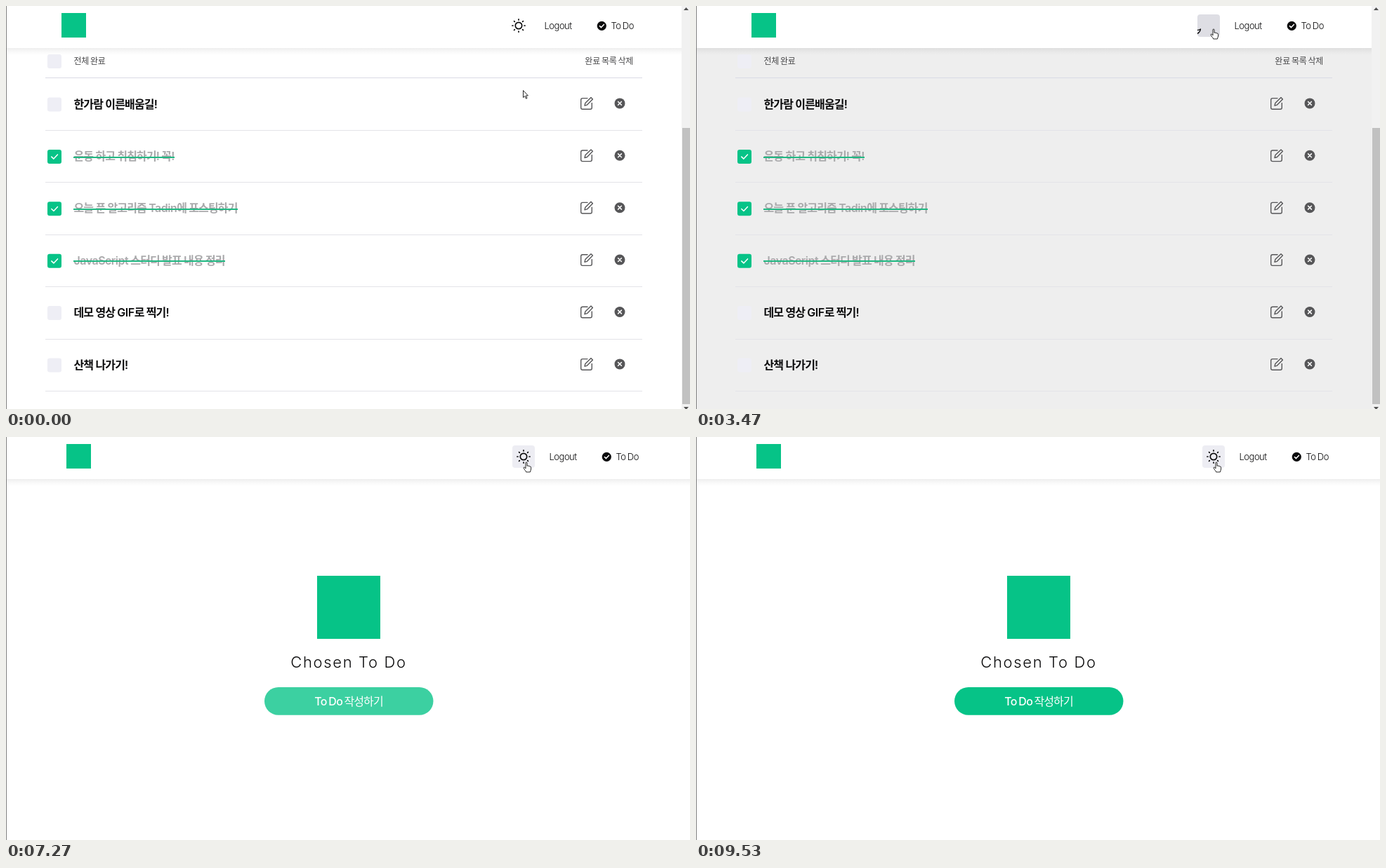
An HTML page for the animation above (9670 ms loop, 974 by 575 pixels).

```html
<!DOCTYPE html>
<html lang="ko">
<head>
<meta charset="utf-8">
<title>To Do</title>
<style>
html, body { margin: 0; width: 100%; height: 100%; overflow: hidden; }
svg {
  display: block; width: 100vw; height: 100vh;
  font-family: Inter, "Noto Sans CJK KR", "Noto Sans CJK", sans-serif;
  --bar: #fff; --ink: #0b0b0c; --sub: #4a4a4c; --done: #a9a9ab; --box: #eeeef5;
  --rule: #d9dae5; --line: #e3e3e8; --icon: #565658; --edge: #808080; --shade: #000; --depth: .065;
}
svg.dark {
  --bar: #08090d; --ink: #fff; --sub: #e2e2ec; --done: #58595c; --box: #17181c;
  --rule: #2a2b30; --line: #1b1c20; --icon: #dcdce8; --edge: #38393c; --shade: #1c1d21; --depth: .6;
}
text { fill: var(--ink); white-space: pre; }
.item { font-size: 16px; font-weight: 600; letter-spacing: -.85px; }
.latin { letter-spacing: -.5px; }
.small { font-size: 12px; font-weight: 500; letter-spacing: -.25px; word-spacing: -1px; fill: var(--sub); }
.nav { font-size: 13px; font-weight: 300; letter-spacing: -.5px; word-spacing: -.8px; }
#title { font-size: 22px; font-weight: 300; letter-spacing: 1.65px; }
.dark .nav, .dark #title { font-weight: 400; }
#start text { fill: #fff; font-weight: 500; word-spacing: -1.5px; }
.brand { fill: #06c387; }
.stroke { fill: none; stroke: var(--icon); stroke-width: 1.4; stroke-linecap: round; stroke-linejoin: round; }
.tick { fill: none; stroke-width: 1.5; stroke-linecap: round; stroke-linejoin: round; }
.crisp { shape-rendering: crispEdges; }
</style>
</head>
<body>
<svg id="stage" viewBox="0 0 974 575" preserveAspectRatio="none">
  <defs>
    <linearGradient id="shade" x2="0" y2="1" stop-color="var(--shade)">
      <stop stop-color="var(--shade)" stop-opacity="1"/>
      <stop offset=".5" stop-color="var(--shade)" stop-opacity=".4"/>
      <stop offset="1" stop-color="var(--shade)" stop-opacity="0"/>
    </linearGradient>
    <clipPath id="clip"><rect x="-16" y="-16" width="32" height="32" rx="4"/></clipPath>
  </defs>
  <rect id="page" width="974" height="575"/>

  <g id="list"></g>

  <g id="home">
    <rect id="mark" class="brand" x="443" width="90" height="90"/>
    <text id="title" x="488" y="329" text-anchor="middle">Chosen To Do</text>
    <g id="start">
      <rect class="brand" x="368" y="357" width="240.5" height="39.7" rx="19.85"/>
      <text class="item" x="488" y="382.5" text-anchor="middle"><tspan class="latin">To Do</tspan> 작성하기</text>
    </g>
  </g>

  <rect width="974" height="60" fill="var(--bar)"/>
  <rect y="60" width="974" height="10" fill="url(#shade)" style="opacity:var(--depth)"/>
  <g id="nav">
    <rect class="brand" x="79" y="10" width="35" height="35"/>
    <g transform="translate(730 28)" clip-path="url(#clip)">
      <rect id="hover" x="-16" y="-16" width="32" height="32"/>
      <g id="icon" fill="none" stroke="var(--ink)" stroke-width="1.7" stroke-linecap="round" stroke-linejoin="round">
        <g id="sun"><circle r="4.7"/></g>
        <path id="moon" transform="scale(.88) translate(-12 -12)" d="M21 12.8A9 9 0 1 1 11.2 3A7 7 0 0 0 21 12.8z"/>
      </g>
    </g>
    <text class="nav" x="766.5" y="33">Logout</text>
    <circle cx="848.3" cy="28.3" r="6.6" fill="var(--ink)"/>
    <path class="tick" stroke="var(--bar)" d="M845.4 28.5l2.1 2.1 3.9-4.2"/>
    <text class="nav" x="861.5" y="33">To Do</text>
  </g>

  <g id="scroll">
    <rect x="962" width="12" height="575" fill="#f1f1f1"/>
    <rect x="963" y="174" width="11" height="394" fill="#c1c1c1"/>
    <path d="M965 6l3.5-4 3.5 4zM965 572h7l-3.5 4z" fill="#505050"/>
  </g>
  <rect width="1" height="575" fill="var(--edge)"/>

  <g id="status">
    <path d="M0 564.5H190a3.5 3.5 0 0 1 3.5 3.5V575H0z" fill="#6c6c6c"/>
    <text x="3" y="576.5" font-size="10.2" style="fill:#fff;font-family:'Open Sans','Noto Sans',sans-serif" letter-spacing="-.3">https://maplerain-wanted-to-do.vercel.app</text>
  </g>

  <g id="cursor" fill="#fff" stroke="#111" stroke-width=".9" stroke-linejoin="round">
    <path id="arrow" d="M.5 .5V10.6L2.8 8.5 4.5 12.2 6 11.5 4.4 7.9H7.4z"/>
    <path id="hand" d="M-1 1C-1-.4 1-.4 1 1V5.4C1.6 4.5 3 4.7 3 5.8 3.8 5 5 5.3 5 6.4 5.8 5.9 6.6 6.3 6.6 7.3V10C6.6 11.6 5.4 12.3 5.4 14H-.4C-.6 12-3.4 10.4-3.9 8.1-4.1 6.9-2.5 6.8-1.9 7.9L-1 9z"/>
  </g>
</svg>
<script>
const LOOP = 9670, HOME_AT = 5000;
const CLICKS = [1370, 3190, 7630, 8700];
const ROWS = [
  ['한가람 이른배움길!'],
  ['운동 하고 취침하기! 꼭!', true],
  ['오늘 푼 알고리즘 Tadin에 포스팅하기', true],
  ['JavaScript 스터디 발표 내용 정리', true],
  ['데모 영상 GIF로 찍기!'],
  ['산책 나가기!'],
];
// time, x, y of the pointer tip
const PATH = [
  [70, 736, 120], [130, 737, 117], [330, 737, 117], [670, 738, 33], [870, 738, 33],
  [930, 737, 33], [4200, 737, 33], [4700, 100, 25], [5000, 100, 30], [5180, 100, 37],
  [5380, 800, 228], [5530, 749, 202], [5800, 749, 202], [6130, 741, 36],
];

const $ = id => document.getElementById(id);
const show = (id, on) => $(id).style.display = on ? '' : 'none';
const ramp = (t, from, to) => Math.min(1, Math.max(0, (t - from) / (to - from)));
const easeOut = p => 1 - (1 - p) ** 2.2;
const smooth = p => p * p * (3 - 2 * p);
const mix = (a, b, p) => a + (b - a) * p;
const blend = (a, b, p) => `rgb(${a.map((v, i) => Math.round(mix(v, b[i], p)))})`;

const checkbox = (y, done) => `
  <rect x="59" y="${y - 10}" width="20" height="20" rx="3" fill="${done ? '#06c387' : 'var(--box)'}"/>
  ${done ? `<path class="tick" stroke="#fff" d="M64.8 ${y + .2}l3.1 3 5.6-6"/>` : ''}`;

const rule = (y, color) =>
  `<rect class="crisp" x="56" y="${y}" width="850" height="1" fill="var(--${color})"/>`;

function row([label, done], i) {
  const y = 140.5 + 74.4 * i;
  const text = label.replace(/[A-Za-z]+/g, '<tspan class="latin">$&</tspan>');
  return `${checkbox(y, done)}
    <text class="item" x="96.5" y="${y + 5}" ${done ? 'data-done style="fill:var(--done)"' : ''}>${text}</text>
    <g transform="translate(827 ${y - 1.6})">
      <path class="stroke" d="M1-7.3H-6Q-8.3-7.3-8.3-5V6Q-8.3 8.3-6 8.3H5Q7.3 8.3 7.3 6V-.5M-3 3.2L-2.1-.5 6-8.4 8.4-6 .5 2.2z"/>
      <circle cx="47" r="7.5" fill="var(--icon)"/>
      <path class="tick" stroke="var(--bar)" d="M44.6-2.4l4.8 4.8m0-4.8l-4.8 4.8"/>
    </g>
    ${rule(Math.round(y + 36.4), 'line')}`;
}

$('list').innerHTML = checkbox(79) + rule(102, 'rule') + `
  <text class="small" x="96.5" y="83.2">전체 완료</text>
  <text class="small" x="893" y="83.2" text-anchor="end">완료 목록 삭제</text>` + ROWS.map(row).join('');

for (const text of document.querySelectorAll('[data-done]')) {
  const y = Math.round(text.getAttribute('y') - 5.4);
  text.insertAdjacentHTML('afterend',
    `<rect class="crisp" x="96" y="${y}" width="${text.getComputedTextLength() + 1}" height="2" fill="#1fb882"/>`);
}
for (let a = 0; a < 360; a += 45)
  $('sun').innerHTML += `<path d="M0-8V-9.1" transform="rotate(${a})"/>`;

function pointer(t) {
  const n = PATH.findIndex(k => k[0] > t);
  if (n < 0) return PATH.at(-1).slice(1);
  if (n === 0) return PATH[0].slice(1);
  const [a, b] = [PATH[n - 1], PATH[n]];
  const p = smooth(ramp(t, a[0], b[0]));
  return [mix(a[1], b[1], p), mix(a[2], b[2], p)];
}

function draw() {
  const t = performance.now() % LOOP;
  const home = t >= HOME_AT, shift = home ? 7 : 0;
  const past = CLICKS.filter(c => c <= t);
  const dark = past.length % 2 === 1;
  const since = past.length ? t - past.at(-1) : LOOP;
  const fade = easeOut(ramp(since, 0, 400));
  const night = dark ? fade : 1 - fade;

  $('stage').classList.toggle('dark', dark);
  $('page').style.fill = blend([255, 255, 255], [8, 9, 13], night);
  show('list', !home);
  show('scroll', !home);
  show('home', home);
  $('nav').setAttribute('transform', `translate(${shift})`);

  // the old icon sets to the left, then the new one arrives from the right
  const leaving = since < 400;
  const away = leaving ? ramp(since, 0, 400) ** 1.4 : (1 - ramp(since, 400, 850)) ** 3;
  $('icon').setAttribute('transform', `translate(${(leaving ? -32 : 32) * away} ${7 * away})`);
  show('moon', dark !== leaving);
  show('sun', dark === leaving);

  const [x, y] = pointer(t);
  const onToggle = y < 44 && Math.abs(x - 730 - shift) < 16;
  const onLogo = y < 46 && x < 140;
  $('hover').style.fill = blend([237, 237, 243], [23, 24, 28], night);
  show('hover', onToggle);
  show('hand', onToggle || onLogo);
  show('arrow', !onToggle && !onLogo);
  $('cursor').setAttribute('transform', `translate(${x} ${y})`);

  $('status').style.opacity = ramp(t, 4680, 4780) * (1 - ramp(t, 5560, 5700));
  $('mark').setAttribute('y', mix(230, 198, smooth(ramp(t, 6200, 6700))));
  $('mark').style.opacity = ramp(t, 5040, 5540);
  $('title').style.opacity = ramp(t, 6500, 7000);
  $('start').style.opacity = ramp(t, 6880, 7380);
  requestAnimationFrame(draw);
}
draw();
</script>
</body>
</html>
```
